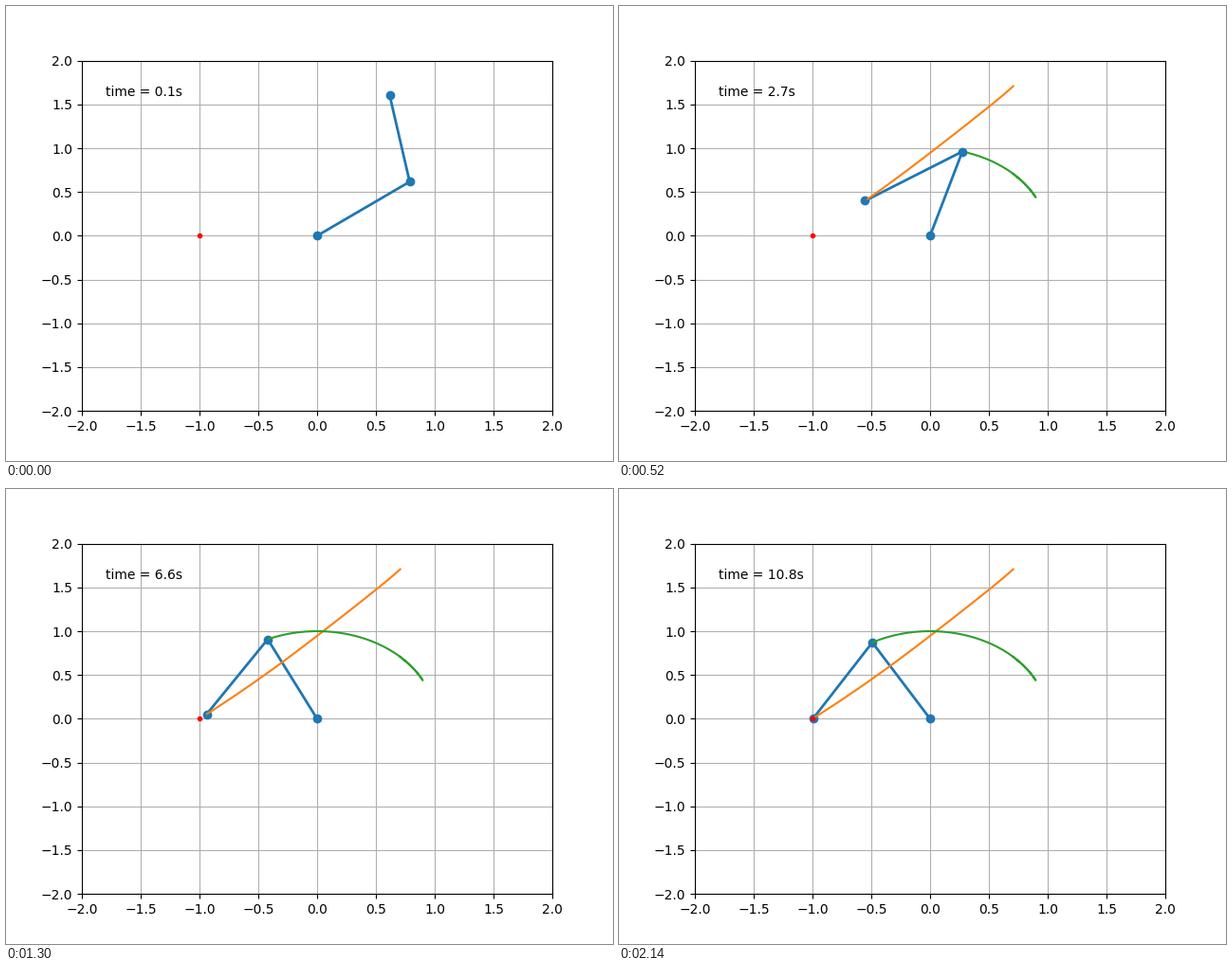
Write a matplotlib script that moves like this. It is 640 px wide and 480 px high and loops after 2.16 s.

```python
import numpy as np
import matplotlib.pyplot as plt
from matplotlib.animation import FuncAnimation

DT = 0.1
GAIN = 0.5
STEPS = 108
TARGET = np.array([-1.0, 0.0])


def joints(q):
    """Elbow and tip of a two-link arm with unit links."""
    elbow = np.array([np.cos(q[0]), np.sin(q[0])])
    a = q.sum()
    return elbow, elbow + [np.cos(a), np.sin(a)]


def jacobian(q):
    elbow, tip = joints(q)
    fore = tip - elbow
    return np.array([[-tip[1], -fore[1]], [tip[0], fore[0]]])


def simulate():
    """Drive the tip to the target with the inverse Jacobian."""
    q = np.array([np.pi / 4, np.pi / 4])
    path = [joints(q)]
    for _ in range(STEPS):
        error = TARGET - path[-1][1]
        q = q + DT * np.linalg.solve(jacobian(q), GAIN * error)
        path.append(joints(q))
    path = np.array(path)
    return path[:, 0], path[:, 1]


elbows, tips = simulate()

fig = plt.figure(figsize=(6.4, 4.8), dpi=100)
ax = fig.add_subplot(xlim=(-2, 2), ylim=(-2, 2))
ax.grid()

arm, = ax.plot([], [], "o-", lw=2)
tip_trail, = ax.plot([], [])
elbow_trail, = ax.plot([], [])
ax.plot(*TARGET, "r.")
clock = ax.text(0.05, 0.9, "", transform=ax.transAxes)


def update(k):
    i = k + 1
    arm.set_data(*np.array([(0, 0), elbows[i], tips[i]]).T)
    tip_trail.set_data(*tips[:i].T)
    elbow_trail.set_data(*elbows[:i].T)
    clock.set_text(f"time = {i * DT:.1f}s")
    return arm, tip_trail, elbow_trail, clock


anim = FuncAnimation(fig, update, frames=STEPS, interval=20, repeat=True)
plt.show()
```
